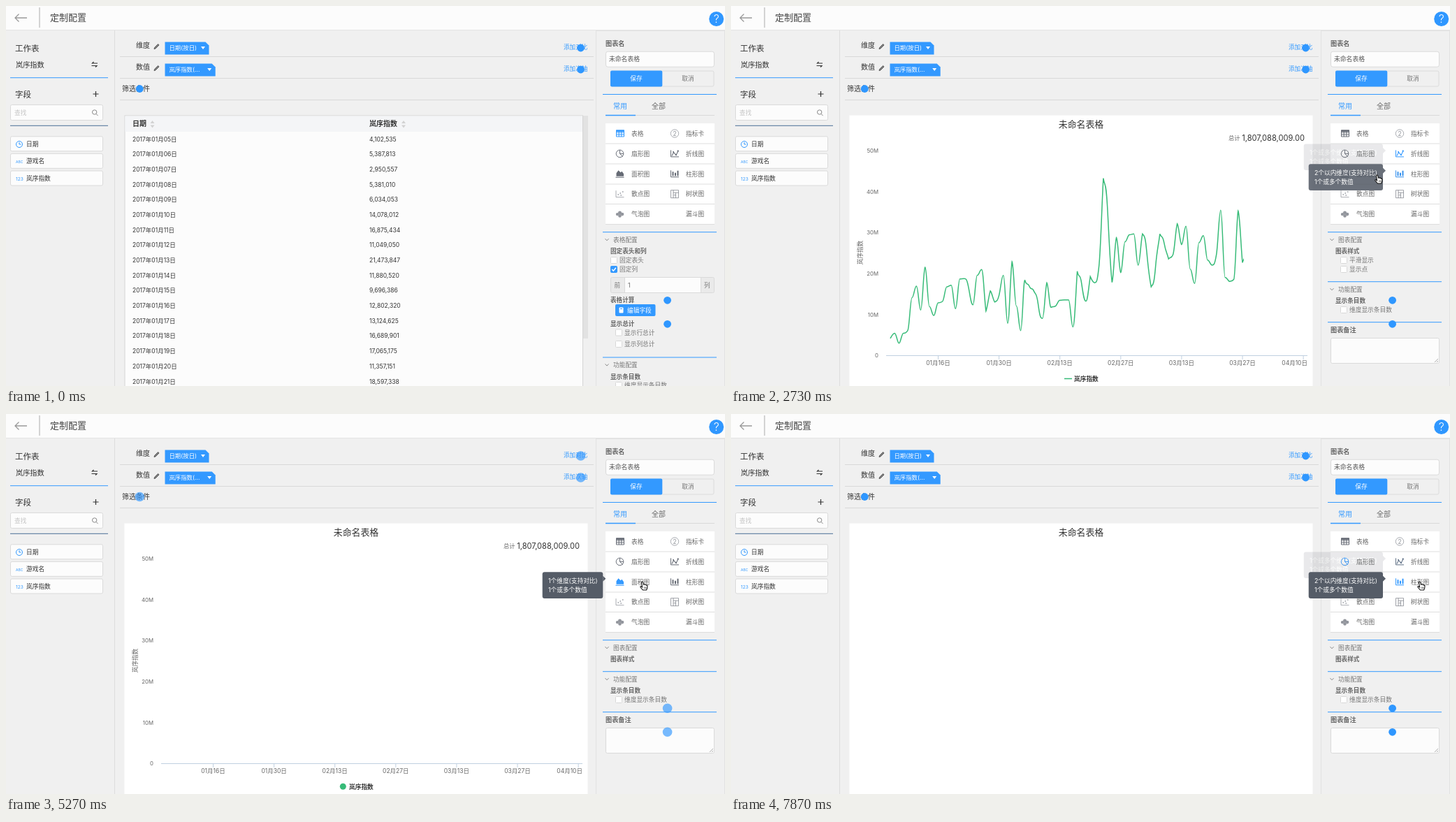
An HTML page that plays this animation: 1029 px wide and 544 px high, repeating every 8000 ms.

```html
<!DOCTYPE html>
<html lang="zh-CN">
<head>
<meta charset="utf-8">
<title>定制配置</title>
<style>
html, body { margin: 0; width: 100%; height: 100%; overflow: hidden; background: #f0f0f0; }
svg { display: block; width: 1029px; height: 544px; font-family: Inter, "Noto Sans CJK SC", "Noto Sans CJK", sans-serif; }
</style>
</head>
<body>
<svg id="stage" viewBox="0 0 1029 544"></svg>
<script>
const LOOP = 8000, BLUE = '#3399ff', GREEN = '#37bb78', INDEX = '岚序指数';
const DAILY = [ // millions per day, from January 5th
  4.102535, 5.387813, 2.950557, 5.38101, 6.034053, 14.078012, 16.875434, 11.04905, 21.473847,
  11.88052, 9.696386, 12.80232, 13.124625, 16.689901, 17.065175, 11.357151, 18.597338,
  18.7, 16.5, 12.3, 19.5, 20.9, 10.8, 15.7, 13, 14.6, 19.5, 7.8, 22.8, 12, 6, 18.2, 16.8, 15.7, 12.5, 9,
  17.7, 11.7, 12, 13.4, 13.5, 13.5, 6.9, 20.5, 17.5, 13.2, 19.2, 17.7, 21.8, 43.2, 34.9, 17.8, 28.7,
  20.2, 27.7, 29.4, 29.6, 22, 29.6, 25, 16.7, 21.5, 29.6, 27.3, 23.5, 24.5, 32.1, 27, 31.5, 21, 17.5,
  27.5, 29.2, 23.2, 22, 24.5, 35.4, 19, 18, 18.5, 35.2, 22.6, 27.5, 36.8, 6, 19.7, 15.8, 20.8, 10.5,
  16.8, 16.5, 12.8, 21, 19, 31.2, 19];

const text = (x, y, s, size = 8.7, fill = '#444', attrs = '') =>
  `<text x="${x}" y="${y}" font-size="${size}" fill="${fill}" ${attrs}>${s}</text>`;
const bold = (x, y, s, size = 8.6, fill = '#666') => text(x, y, s, size, fill, 'font-weight="600"');
const rect = (x, y, w, h, fill, stroke = 'none', r = 0) =>
  `<rect x="${x}" y="${y}" width="${w}" height="${h}" fill="${fill}" stroke="${stroke}" rx="${r}"/>`;
const path = (d, stroke, width = 1, fill = 'none', attrs = '') =>
  `<path d="${d}" stroke="${stroke}" stroke-width="${width}" fill="${fill}" ${attrs}/>`;
const circle = (x, y, r, fill, attrs = '') => `<circle cx="${x}" cy="${y}" r="${r}" fill="${fill}" ${attrs}/>`;
const hline = (x1, x2, y, color = '#d9d9d9', width = 1) => path(`M${x1} ${y}H${x2}`, color, width);
const group = (id, body, attrs = '') => `<g id="${id}" ${attrs}>${body}</g>`;
const box = (x, y, w, h, r = 2) => rect(x + .5, y + .5, w - 1, h - 1, '#fcfcfc', '#dadada', r);
const rule = y => hline(854, 1017, y, BLUE);
const check = (x, y, label, on) => rect(x + .5, y + .5, 9, 9, on ? BLUE : '#fff', on ? BLUE : '#d8d8d8', 1) +
  (on ? path(`M${x + 2.3} ${y + 5}l2 2.2 3.6-4.4`, '#fff', 1.4) : '') + text(x + 13, y + 8.2, label, 8.7, '#777');
const section = (y, label) => rule(y) + path(`M857.5 ${y + 9.5}l2.5 2.6 2.5-2.6`, '#888') +
  text(869, y + 14, label, 8.7, '#777');

function header() {
  return rect(0, 0, 1029, 34, '#fcfcfc') + hline(0, 1029, 34.5, '#e4e4e4') +
    path('M30 17H13M18.5 11.5L13 17l5.5 5.5', '#999', 1.3) + path('M48 2V31', '#aaa') +
    text(63, 21.3, '定制配置', 13, '#444', 'font-weight="500"') +
    circle(1016.7, 18.5, 10.5, '#2f97ff') + text(1016.7, 24, '?', 16, '#fff', 'text-anchor="middle" font-weight="300"');
}

function leftPanel() {
  const field = (y, label) => box(6, y, 133, 22) + text(29, y + 14.5, label, 8.7, '#333');
  const tag = (y, s, size) => text(14, y, s, size, BLUE);
  return path('M155.5 35V544', '#dcdcdc') +
    text(13, 65, '工作表', 11.5, '#333') + text(14, 87.7, INDEX, 10.2, '#333') +
    path('M131 82H123.5l2-2M122.500 85.500H130l-2 2', '#333', 1.2) + hline(6, 146, 102.7, BLUE) +
    text(13, 130.7, '字段', 11.5, '#333') + path('M128.500 122v8M124.500 126h8', '#333', 1.2) +
    box(6, 141, 133, 23) + text(12, 156, '查找', 8.7, '#c4c4c4') +
    circle(126.7, 152, 3.2, 'none', 'stroke="#888"') + path('M129 154.500l2.600 2.600', '#888') +
    hline(6, 146, 171.3, '#4a6f96') +
    field(186.3, '日期') + field(210.9, '游戏名') + field(235.5, INDEX) +
    circle(19, 198, 4.5, 'none', `stroke="${BLUE}"`) + path('M19 195v3h2.500', BLUE) +
    tag(224.5, 'ABC', 5) + tag(249.7, '123', 6.6);
}

function shelves() {
  const pencil = y => path(`M212 ${y + 3.500}l.6-2 5-5 1.400 1.400-5 5z`, '#555', 1, '#888');
  const chip = (y, w, label) => path(`M227.5 ${y}h${w - 4.5}l5 5v13h${-w - .5}z`, 'none', 0, BLUE) +
    text(233.5, y + 11.7, label, 8.4, '#fff') + path(`M${w + 216.500} ${y + 6.500}h6l-3 4z`, 'none', 0, '#fff');
  return text(186, 60, '维度', 10, '#333') + pencil(58) + chip(51.4, 62.5, '日期(按日)') +
    text(186, 91, '数值', 10, '#333') + pencil(89) + chip(82.4, 71.7, INDEX + '(...') +
    text(798, 62, '添加对比', 8.6, BLUE) + text(798, 93, '添加次轴', 8.6, BLUE) +
    text(166, 122, '筛选条件', 10, '#333') +
    [72.5, 103.5, 134.5].map(y => hline(163, 841, y)).join('');
}

function table() {
  const sorter = x => path(`M${x} 168l3-4 3 4zM${x} 170.500h6l-3 4z`, 'none', 0, '#d2d2d2');
  const rows = DAILY.slice(0, 17).map((v, i) => {
    const y = 193.5 + i * 21.69, day = String(i + 5).padStart(2, '0');
    return text(181, y, `2017年01月${day}日`, 8.5, '#333') +
      text(520, y, Math.round(v * 1e6).toLocaleString('en-US'), 8.5, '#333');
  }).join('');
  return rect(825, 157, 8, 387, '#f0f0f0') + rect(825, 157, 8, 319, '#e2e2e2') +
    rect(170, 157, 655.5, 400, '#fcfcfc', '#d4d4d4') + rect(170.5, 157.5, 654.5, 22.5, '#f4f5f7') + rows +
    bold(181, 172, '日期', 10, '#333') + sorter(206.5) + bold(520, 172, INDEX, 10, '#333') + sorter(566);
}

const points = DAILY.map((v, i) => [228 + i * 6.222, 500 - v * 5.868]);
const polyline = 'M' + points.map(p => p.map(n => n.toFixed(1)).join(' ')).join('L');

// Smooth curve whose control points never overshoot their neighbours.
function spline() {
  let d = `M${points[0]}`, lead = points[0];
  for (let i = 1; i < points.length; i++) {
    const [x, y] = points[i], [px, py] = points[i - 1];
    let back = [x, y], next = [x, y];
    if (points[i + 1]) {
      const [nx, ny] = points[i + 1];
      const lx = (1.5 * x + px) / 2.5, rx = (1.5 * x + nx) / 2.5;
      let ly = (1.5 * y + py) / 2.5, ry = (1.5 * y + ny) / 2.5;
      const shift = (ry - ly) * (x - rx) / (rx - lx) + y - ry;
      ly += shift; ry += shift;
      const lo = Math.min, hi = Math.max;
      if (ly > hi(py, y)) { ly = hi(py, y); ry = 2 * y - ly; }
      else if (ly < lo(py, y)) { ly = lo(py, y); ry = 2 * y - ly; }
      if (ry > hi(ny, y)) { ry = hi(ny, y); ly = 2 * y - ry; }
      else if (ry < lo(ny, y)) { ry = lo(ny, y); ly = 2 * y - ry; }
      back = [lx, ly]; next = [rx, ry];
    }
    d += `C${lead} ${back} ${x},${y}`;
    lead = next;
  }
  return d;
}

function chart() {
  const dates = ['01月16日', '01月30日', '02月13日', '02月27日', '03月13日', '03月27日', '04月10日'];
  const xAxis = dates.map((s, i) => {
    const x = 296.5 + i * 87.1, last = i === 6;
    return path(`M${x} 500v6`, '#c0d0e0') +
      text(last ? 825 : x, 513.5, s, 8.5, '#666', `text-anchor="${last ? 'end' : 'middle'}"`);
  }).join('');
  const yAxis = [0, 1, 2, 3, 4, 5].map(n =>
    text(211, 503.3 - n * 58.7, n ? n + '0M' : '0', 7.8, '#666', 'text-anchor="end"')).join('');
  const clip = 'clip-path="url(#reveal)"';
  return group('blank', rect(169.5, 156.5, 663, 400, '#fff') +
      text(501, 174.2, '未命名表格', 12.9, '#333', 'text-anchor="middle"')) +
    group('axes', text(712, 192, '总计', 8.4, '#666') +
      text(821, 192.8, '1,807,088,009.00', 11.1, '#333', 'text-anchor="end"') +
      hline(222, 825, 500.5, '#c0d0e0') + xAxis + yAxis +
      text(0, 0, INDEX, 8.6, '#666', 'text-anchor="middle" transform="translate(188 353) rotate(-90)"') +
      bold(491, 537, INDEX, 8.7, '#333')) +
    group('line', path(spline(), GREEN, 1.5, 'none', clip) + hline(477, 488, 533.5, GREEN, 1.5)) +
    group('area', `<g ${clip}>` + path(polyline + 'V500H228Z', 'none', 0, GREEN, 'opacity=".75"') +
      path(polyline, GREEN, 1.5) + '</g>' + circle(482.3, 533.3, 4.5, GREEN));
}

// Chart types: key, label, icon around its own centre.
const stroke = (d, w = 1) => path(d, 'currentColor', w);
const solid = d => path(d, 'none', 0, 'currentColor');
const soft = body => `<g opacity=".7">${body}</g>`;
const TYPES = [
  ['table', '表格', stroke('M-5-4.500h11v9h-11zM-5-1.500H6M-5 1.500H6M-1.300-4v8.500M2.300-4v8.500') + solid('M-5.500-5h12v2.500h-12z')],
  ['card', '指标卡', soft(circle(0, 0, 5.7, 'none', 'stroke="currentColor" stroke-width=".8"') +
    text(0, 3.2, '2', 8.5, 'currentColor', 'text-anchor="middle"'))],
  ['pie', '扇形图', circle(0, 0, 5.3, 'none', 'stroke="currentColor"') + stroke('M0-5V0H5M0 0l4 4')],
  ['line', '折线图', stroke('M-5.500-5V4.500H6') + stroke('M-4 3l2.500-5 3.500 4 3-6', 1.1) + solid('M3.700-5h2v2h-2zM-2.700-3.300h1.700v1.700h-1.700zM1 1h1.700v1.700h-1.700z')],
  ['area', '面积图', solid('M-6 4.500h12v1h-12zM-5 3.500V-1l3-4 3 3 2-1.500 2.500 3.500v3.500z')],
  ['column', '柱形图', stroke('M-5.500-5V4.500H6') + solid('M-3.500-3h2v6h-2zM0-1.500h2v4.500h-2zM3.500-4.500h2v7.500h-2z')],
  ['scatter', '散点图', soft(stroke('M-5.500-5V4.500H6', .8) + solid('M-3 0h1.500v1.500h-1.500zM0-2h1.500v1.500h-1.500zM1 1h1.500v1.500h-1.500zM3.500-4h1.500v1.500h-1.500z'))],
  ['tree', '树状图', soft(stroke('M-5.500-5.500h11v11h-11zM-2-5.500v11M-2-2h7.500M1.500-2v7.500M1.500 1.500h-3', .9))],
  ['bubble', '气泡图', soft(circle(-3.5, 0, 2.2, 'currentColor') + circle(0, -2, 2.5, 'currentColor') +
    circle(3.5, 0, 2.3, 'currentColor') + circle(0, 2.3, 2.3, 'currentColor'))],
  ['funnel', '漏斗图', '']];

function rightPanel() {
  const types = TYPES.map(([key, label, icon], i) => {
    const y = 182.5 + (i >> 1) * 28.9, right = i % 2;
    return group('icon-' + key, icon, `transform="translate(${right ? 957 : 878.5} ${y})"`) +
      text(right ? 973 : 895, y + 3.2, label, 8.7, '#666');
  }).join('');
  const middle = 'text-anchor="middle"';
  const tableForm = section(323.7, '表格配置') + bold(865, 354, '固定表头和列') +
    check(865, 359, '固定表头') + check(865, 372, '固定列', true) +
    rect(865.5, 388.5, 148, 22, '#eaeaea', '#dadada', 2) + rect(885.5, 388.5, 109, 22, '#fcfcfc', '#dadada') +
    text(870.5, 403, '前', 8.7, '#777') + text(890, 403, '1', 8.7, '#666') + text(999, 403, '列', 8.7, '#777') +
    bold(865, 423.7, '表格计算') + rect(872, 427, 57.5, 17, BLUE, 'none', 2) +
    rect(877.5, 431.5, 6, 8, '#fff', 'none', 1) + hline(879, 882, 433.5, BLUE) + text(889, 439, '编辑字段', 8.7, '#fff') +
    bold(865, 457.5, '显示总计') + check(872, 462.5, '显示行总计') + check(872, 479, '显示列总计') +
    section(503, '功能配置') + bold(865, 533.5, '显示条目数') + check(872, 538, '维度显示条目数');
  const chartForm = section(323.7, '图表配置') + bold(865, 354, '图表样式') +
    group('lineChecks', check(872, 359, '平滑显示') + check(872, 372, '显示点')) +
    group('common', section(394.7, '功能配置') + bold(865, 425, '显示条目数') + check(872, 430, '维度显示条目数') +
      rule(452.7) + bold(858, 467, '图表备注', 9.2) + box(858, 475, 156, 37) + path('M1007 510l5-5M1010 510l2-2', '#999', .8));
  return path('M844.500 35V544M1028.500 35V544', '#e2e2e2') + hline(844, 1029, 35.5, '#e2e2e2') +
    bold(858, 57, '图表名', 9.2) + box(858, 64.7, 156, 23, 3) + text(863, 79.3, '未命名表格', 8.8, '#555') +
    rect(865.5, 93, 147.5, 22, '#f0f0f0', '#dcdcdc', 2) + rect(865, 92.6, 74.3, 22.9, BLUE, 'none', 2) +
    text(902, 107.3, '保存', 8.7, '#fff', middle) + text(976, 107.3, '取消', 8.7, '#777', middle) + rule(126.5) +
    text(869, 147.3, '常用', 10, BLUE) + text(924, 147.3, '全部', 10, '#666') +
    hline(858, 1014, 156.5) + hline(858, 901, 156.5, BLUE, 1.6) + rect(858, 168, 156, 144.5, '#fff') +
    [197, 226, 255, 283.5, 312.5].map(y => hline(858, 1014, y, '#dedede')).join('') + types +
    group('tableForm', tableForm) + group('chartForm', chartForm);
}

const TIPS = {
  line: [819.7, 197.4, 113.3, '1个或多个维度(支持对比)', '1个或多个数值'],
  column: [826.7, 226.3, 106.3, '2个以内维度(支持对比)', '1个或多个数值'],
  area: [767.7, 226.3, 86.6, '1个维度(支持对比)', '1个或多个数值'],
  pie: [768.8, 197.4, 86, '1个维度 1个数值', '0个维度 多个数值']};
const tips = () => Object.entries(TIPS).map(([key, [x, y, w, a, b]]) =>
  group('tip-' + key, rect(x, y, w, 37.6, '#555c67', 'none', 3) +
    path(`M${x + w} ${y + 5.5}l4 4-4 4z`, 'none', 0, '#555c67') +
    text(x + 8.3, y + 15.2, a, 8.7, '#fff') + text(x + 8.3, y + 28.4, b, 8.7, '#fff'))).join('');

const spinner = () => Array.from({ length: 8 }, (_, i) =>
  circle(501 + 24.7 * Math.cos(i * Math.PI / 4), 348.3 + 24.7 * Math.sin(i * Math.PI / 4), 6, '#1b87ee', 'class="spoke"')).join('');
const beacons = [[822.5, 60], [822.5, 91], [191.3, 118.5], [946.6, 421.3], [946.6, 455.3]]
  .map(([x, y]) => circle(x, y, 5.4, '#2f97ff', 'class="beacon"')).join('');
const hand = path('M-3.500-5C-3-6.500-1.500-6-1.300-5L-.5-1.800C.3-2.600 1.300-2.400 1.700-1.500 2.500-2.100 3.400-1.600 3.600-.8 4.500-1 5-.3 5 .6L4.600 3.500 3.600 6H-1.600L-5 2C-5.600 1-4.400.2-3.500 1L-2.400 1.900Z',
  '#111', 1.1, '#fff') + path('M.8 1.500v2.500M2.700 1.500v2.500', '#111', .7);

const stage = document.getElementById('stage');
stage.innerHTML = '<clipPath id="reveal"><rect id="window" x="222" y="190" width="0" height="311"/></clipPath>' +
  header() + leftPanel() + shelves() + group('table', table()) + group('chart', chart()) + rightPanel() +
  group('spinner', spinner()) + beacons + tips() + group('cursor', hand);

const el = id => document.getElementById(id);
const show = (id, on) => { el(id).style.display = on ? '' : 'none'; };
const clamp = n => Math.max(0, Math.min(1, n));
const spokes = [...document.querySelectorAll('.spoke')], dots = [...document.querySelectorAll('.beacon')];

const SELECTED = [[0, 'table'], [1300, 'line'], [4750, 'area'], [6950, 'pie']];
const VIEWS = [[0, 'table'], [1940, 'blank'], [1985, 'line'], [5200, 'blank'], [5265, 'area'], [7800, 'blank']];
const LOADING = [[1400, 1940, 1790, 1], [4850, 5200, 4850, 0], [7000, 7740, 7060, 0]]; // from, to, sync time, head spoke
const HOVERS = [['line', 950, 2600], ['column', 2600, 2850], ['area', 2900, 3300], ['line', 3400, 3650],
  ['pie', 3750, 4230], ['tree', 4150, 4300], ['area', 4400, 6600], ['pie', 6750, 7430],
  ['line', 7450, 7740], ['column', 7710, 9000]];
const POINTER = [[500, 1003, 300], [900, 990, 222], [1790, 989, 219], [2400, 989, 222], [2730, 927, 248],
  [3200, 912, 244], [3500, 1013, 226], [3800, 915, 220], [4100, 966, 262], [4360, 933, 250], [4650, 913, 246],
  [6500, 913, 246], [6800, 915, 224], [7400, 915, 224], [7720, 978, 238], [7870, 988, 246], [8000, 988, 246]];
const FADE = 150;
const current = (steps, t) => steps.filter(s => s[0] <= t).pop();
const hover = (key, t) => Math.max(0, ...HOVERS.filter(h => h[0] === key)
  .map(([, from, to]) => Math.min(clamp((t - from) / FADE), 1 - clamp((t - to) / FADE))));
const tint = k => `rgb(${[[102, 51], [107, 153], [117, 255]].map(([a, b]) => Math.round(a + (b - a) * k))})`;

function draw(t) {
  const selected = current(SELECTED, t)[1], [start, view] = current(VIEWS, t);
  show('table', view === 'table');
  show('chart', view !== 'table');
  show('axes', view === 'line' || view === 'area');
  show('line', view === 'line');
  show('area', view === 'area');
  el('window').setAttribute('width', 603 * (1 - Math.cos(Math.PI * clamp((t - start) / 1000))) / 2);

  show('tableForm', selected === 'table');
  show('chartForm', selected !== 'table');
  show('lineChecks', selected === 'line');
  el('common').setAttribute('transform', `translate(0 ${selected === 'line' ? 0 : -26})`);
  for (const [key] of TYPES) el('icon-' + key).style.color = tint(key === selected ? 1 : hover(key, t));
  for (const key in TIPS) el('tip-' + key).style.opacity = hover(key, t);

  const load = LOADING.find(l => t >= l[0] && t < l[1]);
  show('spinner', load);
  if (load) {
    const head = Math.floor((t - load[2]) / 125) + load[3];
    spokes.forEach((spoke, i) => {
      const glow = 1 - ((head - i) % 8 + 8) % 8 / 8;
      spoke.setAttribute('opacity', .06 + glow * .9);
      spoke.setAttribute('r', 5.9 + glow * 1.6);
    });
  }

  const pulse = Math.sin(Math.PI * clamp((t % 1500 / 1500 - .25) / .55));
  for (const dot of dots) {
    dot.setAttribute('r', 5.4 + pulse * 1.4);
    dot.setAttribute('opacity', 1 - pulse * .35);
  }

  const from = current(POINTER, t);
  show('cursor', from);
  if (from) {
    const to = POINTER[POINTER.indexOf(from) + 1] || from;
    const k = clamp((t - from[0]) / (to[0] - from[0] || 1));
    const at = i => from[i] + (to[i] - from[i]) * k;
    el('cursor').setAttribute('transform', `translate(${at(1)} ${at(2)})`);
  }
}

const origin = performance.now();
function tick() {
  draw((performance.now() - origin) % LOOP);
  requestAnimationFrame(tick);
}
tick();
</script>
</body>
</html>
```
